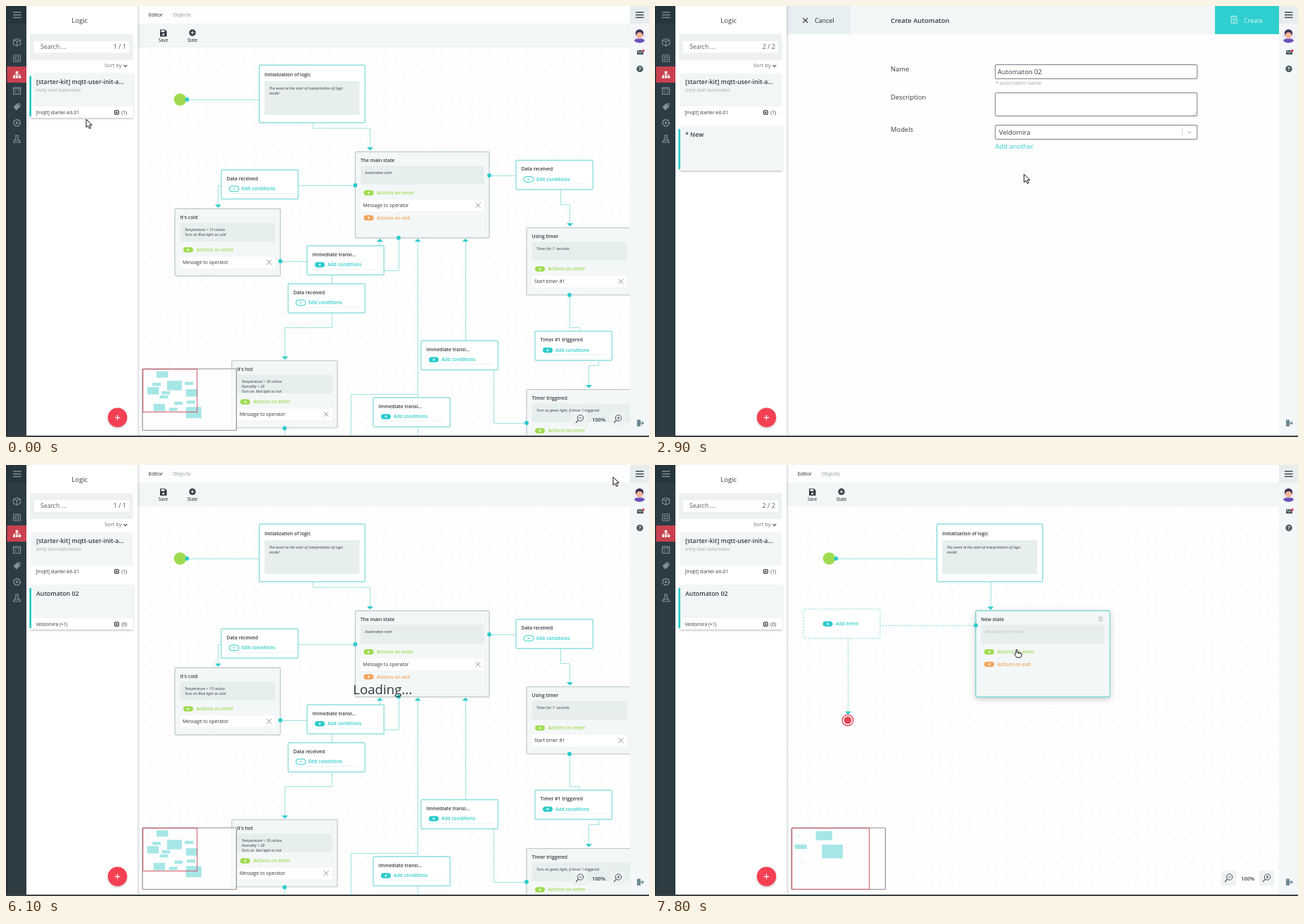
An HTML page that plays this animation: 914 px wide and 613 px high, repeating every 8 s.

```html
<!DOCTYPE html>
<html lang="en">
<head>
<meta charset="utf-8">
<title>Logic editor</title>
<style>
html, body { margin: 0; width: 100%; height: 100%; overflow: hidden; background: #fdfefd; }
svg { display: block; position: absolute; left: 0; top: 0; }
text { font-family: "Open Sans", "Noto Sans", sans-serif; white-space: pre; }
</style>
</head>
<body>
<svg id="stage" width="914" height="613" viewBox="0 0 914 613" xmlns="http://www.w3.org/2000/svg">
<defs>
  <pattern id="dots" x="187" y="59" width="13.333" height="13.333" patternUnits="userSpaceOnUse">
    <circle cx="6" cy="6" r=".7" fill="#e2e8e8"/>
  </pattern>
  <filter id="soft" x="-20%" y="-20%" width="140%" height="150%">
    <feDropShadow dx="0" dy="1.3" stdDeviation="1.8" flood-color="#000" flood-opacity=".26"/>
  </filter>
  <filter id="wide" x="-20%" y="-20%" width="140%" height="150%">
    <feDropShadow dx="0" dy="2.5" stdDeviation="4" flood-color="#000" flood-opacity=".2"/>
  </filter>
  <linearGradient id="edge"><stop stop-color="#000" stop-opacity=".13"/><stop offset="1" stop-color="#000" stop-opacity="0"/></linearGradient>
</defs>
</svg>
<script>
const TEAL = '#2ccbcb', LINE = '#8fdede', WIRE = '#a0e2e2', GREEN = '#9fdb4f', ORANGE = '#f2a45c', RED = '#f43f53', INK = '#333b40';
const stage = document.getElementById('stage');
const MODEL = 'Veldomira', KIT = '[mqtt] starter-kit-01';

// ---- markup helpers
const rect = (x, y, w, h, fill, more = '') => `<rect x="${x}" y="${y}" width="${w}" height="${h}" fill="${fill}" ${more}/>`;
const disc = (x, y, r, fill, more = '') => `<circle cx="${x}" cy="${y}" r="${r}" fill="${fill}" ${more}/>`;
const path = (d, color = LINE, w = 1, more = '') => `<path d="${d}" fill="none" stroke="${color}" stroke-width="${w}" ${more}/>`;
const text = (x, y, size, str, fill = INK, more = '') => `<text x="${x}" y="${y}" font-size="${size}" fill="${fill}" ${more}>${str}</text>`;
const bold = 'font-weight="600"', italic = 'font-style="italic"', soft = 'filter="url(#soft)"';
const stroke = (c, w = 1) => `stroke="${c}" stroke-width="${w}"`;
const cross = (x, y, r = 3.5, c = '#777', w = .8) => path(`M${x - r} ${y - r}l${2 * r} ${2 * r}m0 ${-2 * r}l${-2 * r} ${2 * r}`, c, w);
const chevron = (x, y, r, c, w = 1) => path(`M${x - r} ${y - r / 2}l${r} ${r}l${r} ${-r}`, c, w);
const dot = (x, y) => disc(x, y, 2.9, TEAL);
const arrow = (x, y, dir = 1) => `<path d="M${x - 4.5} ${y - 2 * dir}h9l-4.5 ${4.5 * dir}z" fill="${TEAL}"/>`;

function add(markup) {
  const g = document.createElementNS('http://www.w3.org/2000/svg', 'g');
  g.innerHTML = markup;
  stage.appendChild(g);
  return g;
}

// ---- diagram parts
function pill(x, y, color, sign = '+', hollow = false) {
  const fg = hollow ? color : '#fff';
  return rect(x - 7, y - 3.8, 14, 7.6, hollow ? '#fff' : color, `rx="3.8" ${hollow ? stroke(color) : ''}`) +
    path(`M${x - 1.8} ${y}h3.6` + (sign === '+' ? `M${x} ${y - 1.8}v3.6` : ''), fg, .9);
}

function note(x, y, lines, color = INK) {
  return lines.map((s, i) => text(x, y + i * 6.8, 5.28, s, color, italic)).join('');
}

function eventBox(x, y, title, edit) {
  return rect(x, y, 109.3, 41.5, '#fff', `rx="1.5" ${stroke(LINE, 1.4)}`) +
    text(x + 7.5, y + 14.8, 6.75, title, INK, bold) +
    pill(x + 18, y + 27, TEAL, edit ? '-' : '+', edit) +
    text(x + 29, y + 29.4, 6.7, edit ? 'Edit conditions' : 'Add conditions', TEAL, bold) +
    path(`M${x + 10} ${y + 33.5}h92`, '#e4f1f1', .8);
}

function stateBox(x, y, w, h, title, lines, parts, border = '#bcc6c8') {
  let s = rect(x, y, w, h, '#f4f7f7', `rx="1.5" ${stroke(border, 1.2)}`) +
    text(x + 7.5, y + 14.5, 6.75, title, INK, bold) +
    rect(x + 7.5, y + 20, w - 15, 26.5, '#e7eeee') + note(x + 14, y + 31.4, lines, title === 'New state' ? '#b3bcbd' : INK);
  let cy = y + 58.5;
  for (const part of parts) {
    if (part === 'enter' || part === 'exit') {
      const c = part === 'enter' ? GREEN : ORANGE;
      s += pill(x + 19, cy, c) + text(x + 30.4, cy + 2.4, 6.7, 'Actions on ' + part, c, bold);
    } else {
      s += rect(x + 7.5, cy - 8, w - 15, 16.5, '#fff') + text(x + 11, cy + 2.5, 6.75, part) + cross(x + w - 16, cy);
    }
    cy += 17.7;
  }
  return s;
}

function initBox(x) {
  return path(`M257 133.5H${x}`, WIRE) + disc(247.5, 133, 8.8, GREEN) + dot(257.3, 133) +
    rect(x, 84, 150.3, 82, '#fff', `rx="1.5" ${stroke(LINE, 1.5)}`) +
    text(x + 7.5, 99.7, 6.75, 'Initialization of logic', INK, bold) +
    rect(x + 7.5, 107, 135, 48, '#e7eeee') +
    note(x + 14, 118.8, ['The event at the start of interpritation of logic', 'model']);
}

function minimap(k, boxes) {
  const mx = x => 194.9 + (x - 187) * k, my = y => 516.8 + (y - 59) * k;
  return rect(194, 516, 133.5, 87.5, '#fff', `fill-opacity=".72" rx="1" ${stroke('#8b9294', 1.2)}`) +
    boxes.map(([x, y, w, h]) => rect(mx(x), my(y), w * k, h * k, '#a6e6e6')).join('') +
    rect(194.7, 516.7, 700 * k, 552 * k, 'none', stroke('#cf5363', 1));
}

const canvasBack = rect(187, 59, 700, 554, '#fdfefd') + rect(187, 59, 700, 554, 'url(#dots)');

// ---- first diagram
const events = [
  [306, 233, 'Data received', 1], [428, 341, 'Immediate transi...', 0], [401, 395, 'Data received', 1],
  [725, 219.5, 'Data received', 1], [590, 476, 'Immediate transi...', 0], [522, 557, 'Immediate transi...', 0],
  [752, 462.5, 'Timer #1 triggered', 0]
];
const states = [
  [496.5, 207.3, 190.5, 122.5, 'The main state', ['Automaton start'], ['enter', 'Message to operator', 'exit']],
  [240, 288.3, 150, 95.5, "It's cold", ['Temperature &lt; 15 celsius', 'Turn on Blue light as cold'], ['enter', 'Message to operator']],
  [321, 504.5, 150, 95.5, "It's hot", ['Temperature &gt; 30 celsius', 'Humidity &lt; 20', 'Turn on  Red light as hot'], ['enter', 'Message to operator']],
  [740, 315.5, 150, 95.5, 'Using timer', ['Timer for 7  seconds'], ['enter', 'Start timer #1']],
  [740, 545.5, 200, 145, 'Timer triggered', ['Turn on green light, if timer 1 triggered'], ['enter']]
];
const wires = 'M436.5 166v8H517.5V203M496 255.5H301.5V285M390 363.5h38M558.5 330v46.5H463.5V395M463.5 436v21.5H396.5V500' +
  'M531.5 334v8M585.5 334V557M653.5 334V476M490.5 612V552.5H585.5M585.5 598v14M693.5 517V593.5H740M687 241.5h38' +
  'M788.5 261v21.5H801.5V311M801.5 411V457.5H815.5V463M842.5 504v7.5H828.5V541M396.5 600v12';
const fullGraph = add(canvasBack + path(wires, WIRE) + initBox(360) +
  states.map(s => stateBox(...s)).join('') + events.map(e => eventBox(...e)).join('') +
  [[517.5, 203], [301.5, 284.5], [396.5, 500.5], [801.5, 311], [828.5, 541]].map(p => arrow(...p)).join('') +
  [531.3, 585.3, 653].map(x => arrow(x, 333.3, -1)).join('') +
  [[496.5, 255], [687, 241], [390, 363], [558, 329.7], [801, 411], [740, 593], [396, 600.5]].map(p => dot(...p)).join('') +
  minimap(.11, [[240, 125, 12, 12], [360, 84, 150, 82], ...states, ...events.map(e => [e[0], e[1], 109, 41])]));

// ---- new diagram
const newState = border => stateBox(456, 207.3, 190.5, 122.5, 'New state', ['Description of the state'], ['enter', 'exit'], border);
const newGraph = add(canvasBack + path('M477.5 166V203', WIRE) + initBox(400.7) + arrow(477, 203.5) + newState() +
  minimap(.157, [[246, 128, 10, 10], [401, 84, 150, 82], [456, 207, 190, 123], [211, 205, 109, 41], [270, 358, 10, 10]]));
const dash = 'stroke-dasharray="2.7 1.8"';
const hoverState = add(
  path('M456 228.5H320M274.5 246V351', LINE, 1, dash) +
  rect(211, 205, 109, 41.5, '#fff', `rx="1.5" ${stroke(LINE)} ${dash}`) +
  pill(245.5, 226, TEAL) + text(257, 228.4, 6.6, 'Add event', TEAL, bold) + arrow(274.5, 352.5) +
  disc(274, 363, 7.8, '#fff', stroke('#e0495a', 1.5)) + disc(274, 363, 5.4, '#e0495a') +
  `<g filter="url(#wide)">${newState('#74d8d8')}</g>` + dot(456, 228) +
  path('M630.5 217h6M632.2 217v-1.4h2.6v1.4M631.2 217v5.3h4.6V217M632.8 218.5v2.5M634.2 218.5v2.5', '#aeb8ba', .7));

// ---- editor chrome
const zoomIcon = (x, sign) => rect(x - 10.5, 577, 21, 21, '#eef2f3', 'rx="1.5"') +
  disc(x + 1, 586, 4.2, 'none', stroke(INK, .9)) + path(`M${x - 2} 589.2l-3.5 3.6`, INK, 1.1) +
  path(`M${x - 1} 586h4` + (sign === '+' ? `M${x + 1} 584v4` : ''), INK, .8);
const editor = add(rect(187, 0, 700, 25, '#fdfefe') + rect(187, 25, 700, 34, '#f3f6f7') +
  text(202.7, 15.4, 7.33, 'Editor', '#222a2e') + text(237, 15.4, 7.33, 'Objects', '#8c9598') +
  `<path d="M219 33.5h7l2.5 2.5v7.5h-9.5z" fill="${INK}"/>` + rect(220.5, 34.5, 5, 2.6, '#f3f6f7') + disc(223.7, 40.4, 1.5, '#f3f6f7') +
  disc(265, 38, 4.7, INK) + path('M262.5 38h5M265 35.5v5', '#fff', 1) +
  text(223.5, 50.5, 6.2, 'Save', '#20282c', 'text-anchor="middle"') + text(265, 50.5, 6.2, 'State', '#20282c', 'text-anchor="middle"') +
  zoomIcon(815.5, '-') + zoomIcon(869.5, '+') +
  text(842.5, 590.6, 7.4, '100%', INK, bold + ' text-anchor="middle"'));
const loading = add(text(493.3, 326, 18.67, 'Loading...', '#30383c'));

// ---- form
const box = (y, h) => rect(483.7, y, 287, h, '#fff', `rx="1.5" ${stroke('#6a7275', .9)}`);
const select = (y, val) => box(y, 20) + text(489, y + 13.6, 9.4, val) + path(`M749.5 ${y + 5}v10`, '#c9cdd0', .9) + chevron(760, y + 10.3, 2.6, '#c0c5c8', 1.1);
const badge = (y, n, c) => disc(473, y, 6.2, c) + text(473, y + 2.4, 6.4, n, '#5e6552', 'text-anchor="middle"');
const link = y => text(483.5, y, 9.4, 'Add another', TEAL);
const form = add(rect(187, 0, 700, 613, '#fdfefd') + rect(187, 0, 700, 40, '#f3f6f7') +
  rect(187, 0, 91, 40, '#e7eff0') + cross(213.7, 20.5, 3.4, '#20282c', 1.1) + text(227, 23.8, 8.9, 'Cancel', '#20282c') +
  text(335, 23.8, 9.4, 'Create Automaton', INK, bold) +
  text(335, 93.3, 9.4, 'Name') + text(335, 133.3, 9.4, 'Description') + text(335, 179.2, 9.4, 'Models') +
  box(83.5, 20) + text(487, 97.3, 9.45, 'Automaton 02') + text(484, 112, 7.3, '* automaton name', '#a2a9ac') +
  box(123.5, 33) + path('M769.5 151l-5 5M769.5 154l-2 2', '#888', .7) + select(169.5, MODEL));
const oneModel = add(link(202.7));
const twoModels = add(badge(179.5, 1, '#f0e29a') + badge(202.7, 2, '#b9e28c') + select(193.2, KIT) +
  cross(779.7, 180) + cross(779.7, 203.5) + link(226.6));
const focused = add(chevron(760, 203.5, 2.6, '#4a5256', 1.2));
const menu = add(rect(483.7, 215.5, 287, 54, '#fff', `rx="1.5" ${soft}`) + rect(483.7, 242.5, 287, 25, '#dcf5f5') +
  text(489, 233.5, 9.4, MODEL) + text(489, 258.5, 9.4, KIT));
const caret = add(rect(488, 197, 1, 13, '#222'));
const createBtn = add(rect(796, 0, 91, 40, '#2fcfcf') +
  path('M819 14.5h7.5v5M819 14.5v9.5h4M821 17h3.5M821 19.5h2.5', '#dff8f7', .9) + disc(825.5, 22.5, 2.6, 'none', stroke('#dff8f7', .9)) +
  text(837, 23.6, 8.8, 'Create', '#e2f9f8'));
const createRect = createBtn.firstChild;

// ---- left panel
add(rect(187, 0, 4, 613, 'url(#edge)') + rect(29, 0, 157.5, 613, '#fff') +
  text(104.7, 24, 9.5, 'Logic', INK, 'text-anchor="middle"') + rect(34, 40, 146.5, 37, '#edf1f2') + rect(40, 50, 135, 16.5, '#fff') +
  text(49, 61.4, 8.7, 'Search ...', '#555e62') + text(140, 87.3, 7.5, 'Sort by', '#6a7377') + chevron(169.8, 85.2, 2.4, '#555', 1.2));
const count = add(text(171, 61.4, 9.1, '', '#555e62', 'text-anchor="end"')).firstChild;
const cardBody = (y, foot, n) => rect(35, y, 145.5, 63, '#f3f6f7') +
  (foot ? rect(35, y + 47, 145.5, 16, '#fff') + text(42.5, y + 58, 6.7, foot, '#30383c') +
    rect(154.5, y + 52.5, 5.6, 5.6, '#fff', `rx="1" ${stroke('#333', 1.2)}`) + rect(156.2, y + 54.2, 2.2, 2.2, '#333') +
    text(172, y + 58, 6.7, `(${n})`, '#30383c', 'text-anchor="end"') : '');
const shade = y => `<g ${soft}>` + rect(35, y, 145.5, 63, '#f3f6f7') + '</g>';
const bar = y => rect(33.3, y + 4, 2.7, 57, TEAL);
const firstSel = add(shade(96));
add(cardBody(96, KIT, 1) + text(43, 111.3, 8.75, '[starter-kit] mqtt-user-init-a...', INK, bold) +
  text(43, 121.8, 6.6, 'entry level automaton', '#a3abae', italic));
const firstBar = add(bar(96));
const newCard = add(shade(171) + cardBody(171) + bar(171) + text(43, 186, 8.8, '* New', INK, bold));
const doneCard = add(shade(171) + cardBody(171, MODEL + ' (+1)', 0) + bar(171) + text(43, 186, 8.8, 'Automaton 02', INK, bold));
const fab = add(disc(158.5, 585.3, 13.7, RED, soft) + path('M154.7 585.3h7.6M158.5 581.5v7.6', '#fff', 1.2)).firstChild;

// ---- side rails
const burger = (x, c) => [9, 12.7, 16.4].map(y => rect(x, y - .7, 11.5, 1.4, c)).join('');
const G = '#82929a', D = '#2d3c43';
add(rect(0, 0, 29, 613, D) + rect(0, 0, 1.5, 613, '#202a2f') + rect(1.5, 0, 27.5, 25, '#25353c') + burger(10, '#82929a') +
  rect(1.5, 86, 27.5, 23, '#c9414f') +
  path('M15.5 46.5l5 2v6l-5 2.3l-5-2.3v-6zM10.5 48.5l5 2l5-2M15.5 50.5v6', G, 1.1) +
  rect(10.7, 69.7, 9.6, 9.6, 'none', `rx="1" ${stroke(G, 1.1)}`) + rect(13.3, 72.3, 4.4, 4.4, 'none', stroke(G)) +
  rect(13.7, 92.8, 3.6, 3.4, '#fff') + [10, 14, 18].map(x => rect(x, 99.4, 3.2, 3.2, '#fff')).join('') + path('M11.6 99.5v-1.7h8v1.7M15.5 96v3.5', '#fff', .8) +
  rect(10.5, 116, 10, 9.5, 'none', stroke(G, 1.1)) + path('M10.5 118h10M14.3 120l-1.8 1.8l1.8 1.8M16.8 120l1.8 1.8l-1.8 1.8', G, 1) +
  `<path d="M10.5 143.5l5.5-5h4.3v4.5l-5.6 5.5z" fill="${G}"/>` + disc(18.3, 140.5, .9, D) +
  disc(15.5, 166.2, 4.6, 'none', stroke(G, 1.8) + ' stroke-dasharray="3 .8"') + disc(15.5, 166.2, 1.6, G) +
  path('M13 184h5M14 184v4l-3.5 6h10l-3.5-6v-4M12 191h7', G, 1.2) +
  rect(887, 0, 27, 613, '#f3f7f8') + rect(887, 0, 27, 25, '#e7eced') + burger(895, '#33424a') +
  disc(900.5, 42.5, 9.8, '#eeedf5') + disc(900.5, 38.8, 5.6, '#3b2b52') + disc(900.5, 41.8, 4.5, '#f0b698') +
  '<path d="M893 49.5q1-3 5-3h5q4 0 5 3q-3 3-7.5 3t-7.5-3z" fill="#6c52b8"/>' +
  rect(897, 63, 9, 6, '#4b5a61') + path('M897.5 64l4 2.7l4-2.7', '#f3f7f8', .8) + disc(906, 63.5, 1.7, '#e0394d') +
  disc(901, 89.5, 4.7, '#4b5a61') + text(901, 92.3, 7.5, '?', '#fff', 'font-weight="700" text-anchor="middle"') +
  rect(897, 588.5, 5, 9.5, '#6c8a94') + path('M900.5 593.3h5M903.7 591l2.4 2.3l-2.4 2.3', '#6c8a94', 1.3) +
  rect(0, 611, 914, 2, '#3a4144'));

// ---- pointer
const arrowCur = add('<path d="M0 0v11.5l2.7-2.4l1.9 4.3l2-.9l-1.9-4.2h3.6z" fill="#fff" stroke="#111" stroke-width="1"/>');
const handCur = add('<path d="M-.8 6V1q.9-1.5 1.9 0v3.5l5 .8q1.3.3 1.2 1.7l-.6 3.2l-1 1.6h-5.5l-3-4.3q-.4-1.5 1-1.3z" fill="#fff" stroke="#111" stroke-width="1"/>' +
  path('M2.5 5v2M4.6 5.3v1.9', '#111', .7));

// time, x, y
const track = [
  [0, 114, 161], [100, 214, 200], [1000, 214, 200], [1800, 154, 580], [2000, 154, 580], [2800, 529, 254],
  [3100, 512, 197], [3900, 512, 197], [4000, 552, 201], [4100, 556, 199], [5200, 556, 199], [5600, 863, 17],
  [6200, 863, 17], [6600, 894, 38], [7300, 517, 273], [7500, 517, 273], [7800, 514, 262], [8000, 514, 262]
];
function pointer(t) {
  const i = track.findIndex((k, n) => t < track[n + 1][0]);
  const [a, b] = [track[i], track[i + 1]];
  const u = (t - a[0]) / (b[0] - a[0]), e = u * u * (3 - 2 * u);
  return [a[1] + (b[1] - a[1]) * e, a[2] + (b[2] - a[2]) * e];
}

const within = (t, from, to) => t >= from && t < to;
const show = (g, on) => g.setAttribute('display', on ? 'inline' : 'none');

function draw(now) {
  const t = Math.floor(now % 8000 / 100) * 100;
  const [x, y] = pointer(t);
  const making = within(t, 2000, 5800), fresh = t >= 6500;
  const onFab = Math.hypot(x - 158.5, y - 585.5) < 14;
  const onCreate = making && x > 796 && y < 40;
  const onLink = within(t, 3000, 3300);

  show(fullGraph, !making && !fresh);
  show(newGraph, fresh);
  show(hoverState, fresh && x < 647 && y > 207);
  show(editor, !making);
  show(loading, within(t, 5800, 6500));
  show(form, making);
  show(createBtn, making);
  show(oneModel, within(t, 2000, 3300));
  show(twoModels, within(t, 3300, 5800));
  show(focused, within(t, 4200, 5800));
  show(menu, within(t, 4200, 5200));
  show(caret, within(t, 4200, 4700));
  show(firstSel, t < 2300);
  show(firstBar, t < 2300);
  show(newCard, making);
  show(doneCard, t >= 5800);
  count.textContent = making || fresh ? '2 / 2' : '1 / 1';
  fab.setAttribute('fill', onFab ? '#d6243a' : RED);
  createRect.setAttribute('fill', onCreate ? '#27b9ba' : '#2fcfcf');

  const hand = onFab || onCreate || onLink || t >= 7600;
  show(arrowCur, !hand);
  show(handCur, hand);
  (hand ? handCur : arrowCur).setAttribute('transform', `translate(${x.toFixed(1)} ${y.toFixed(1)})`);
}

const start = performance.now();
function tick() {
  draw(performance.now() - start);
  requestAnimationFrame(tick);
}
tick();
</script>
</body>
</html>
```
